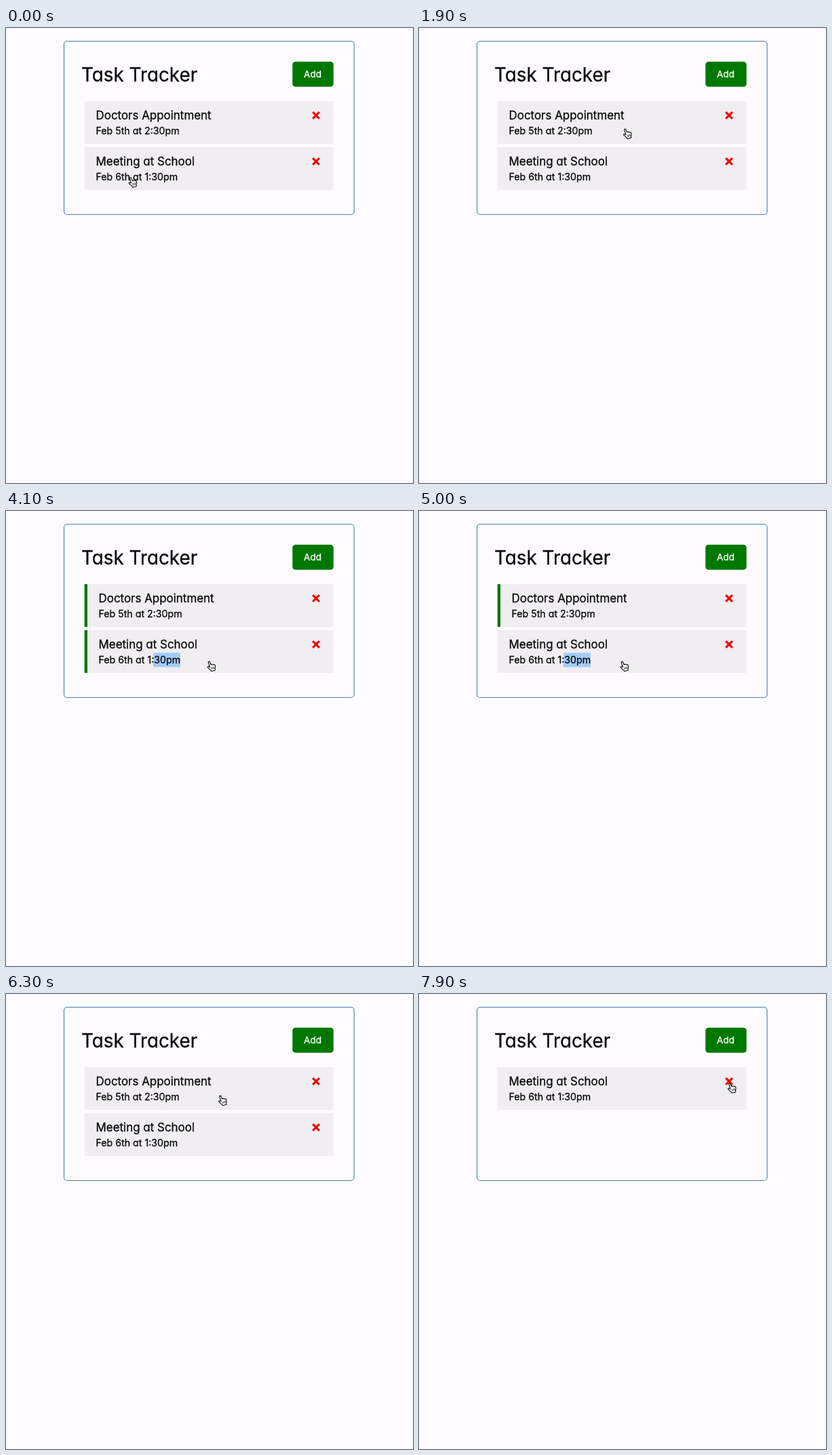
An HTML page that plays this animation: 600x672 px, repeating every 8000 ms.

```html
<!DOCTYPE html>
<html lang="en">
<head>
<meta charset="utf-8">
<title>Task Tracker</title>
<style>
  html, body { margin: 0; width: 100%; height: 100%; overflow: hidden; background: #fdfbff; }
  svg { display: block; width: 600px; height: 672px; }
  text {
    font-family: Inter, "Open Sans", sans-serif;
    font-feature-settings: "cv11";
    font-optical-sizing: none;
    fill: #0b0b0b;
    stroke: #0b0b0b;
    stroke-width: .3px;
  }
  .heading { font-size: 27.8px; }
  .add { font-size: 13.6px; fill: #fff; stroke: #fff; }
  .name { font-size: 16.95px; }
  .date { font-size: 14.2px; }
  .row { fill: #f0eef1; }
  .green { fill: #007800; }
  .remove { fill: none; stroke: #ee0508; stroke-width: 3.1; stroke-linecap: square; }
  .mark { fill: #a3cbfa; }
  .hand { fill: #fff; stroke: #111; stroke-width: 1.15; stroke-linejoin: round; stroke-linecap: round; }
</style>
</head>
<body>
<svg viewBox="0 0 600 672">
  <rect x="85.5" y="19.5" width="427.7" height="256" rx="4.5" fill="none" stroke="#4682b4" stroke-width="1.1"/>
  <text class="heading" x="111" y="78.5">Task Tracker</text>
  <rect class="green" x="422.3" y="49.7" width="60.5" height="37" rx="4.5"/>
  <text class="add" x="439" y="73">Add</text>
  <g id="tasks"></g>
  <g id="cursor" class="hand">
    <g transform="rotate(-8 6 8)">
      <path d="M2.6 2.2C2.2 .7 4.3 .2 4.8 1.8L6 6C6.3 5.2 8 5.3 8.1 6.3C8.7 5.6 10 5.8 10.1 6.9C10.8 6.4 11.8 6.9 11.9 8C12.1 10 11.8 11.2 10.9 12.8V15L5.2 15.7L4.8 14.3C3.2 13 2 11 .7 9.5C0 8.5 1 7.6 2 8.1L3.9 9.3Z"/>
      <path d="M6 10.2L6.3 12.6M7.9 10L8.2 12.4M9.7 9.8L9.9 12.1" stroke-width=".8"/>
    </g>
  </g>
</svg>
<script>
const LOOP = 8000, STEP = 100, ROW_PITCH = 68;

// Cursor stops: time, centre x, centre y
const path = [
  [0, 186.5, 227.5], [700, 303, 158], [900, 303, 158], [1100, 307, 156],
  [2900, 307, 156], [3300, 303.5, 229], [3700, 302.5, 229], [5500, 302.5, 229],
  [6000, 319, 157], [6400, 319, 157], [6900, 445.5, 140], [7300, 461, 138.5],
  [LOOP, 461, 138.5]
];
const within = (t, from, to) => t >= from && t < to;
const smooth = p => p * p * (3 - 2 * p);

function cursorAt(t) {
  const i = path.findIndex((stop, n) => n && t < stop[0]);
  const [t0, x0, y0] = path[i - 1], [t1, x1, y1] = path[i];
  const p = smooth((t - t0) / (t1 - t0));
  return [x0 + (x1 - x0) * p, y0 + (y1 - y0) * p];
}

const taskMarkup = (name, date) => `
  <g>
    <rect class="row" x="115.7" y="108" width="367" height="63.2"/>
    <rect class="bar green" x="115.7" y="108" width="4.3" height="63.2"/>
    <path class="remove" d="M453.3 125.2l7.6 7.6m0-7.6l-7.6 7.6"/>
    <g class="label">
      <rect class="mark" x="213" y="141.5" width="40" height="21"/>
      <text class="name" x="132.5" y="135">${name}</text>
      <text class="date" x="132.5" y="157">${date}</text>
    </g>
  </g>`;

const list = document.getElementById("tasks");
list.innerHTML = taskMarkup("Doctors Appointment", "Feb 5th at 2:30pm") +
  taskMarkup("Meeting at School", "Feb 6th at 1:30pm");
const [doctor, school] = list.children;
const cursor = document.getElementById("cursor");

const show = (node, on) => node.setAttribute("visibility", on ? "inherit" : "hidden");
const move = (node, x, y) => node.setAttribute("transform", `translate(${x} ${y})`);

function setTask(task, { slot, visible, reminder, marked }) {
  move(task, 0, slot * ROW_PITCH);
  show(task, visible);
  show(task.querySelector(".bar"), reminder);
  show(task.querySelector(".mark"), marked);
  move(task.querySelector(".label"), reminder ? 4 : 0, 0);
}

function render(t) {
  const deleted = t >= 7500;
  setTask(doctor, {
    slot: 0, visible: !deleted, reminder: within(t, 2500, 6200), marked: false
  });
  setTask(school, {
    slot: deleted ? 0 : 1, visible: true,
    reminder: within(t, 3700, 5000), marked: within(t, 3700, 6100)
  });
  const [x, y] = cursorAt(t);
  move(cursor, x - 6, y - 8);
}

const start = performance.now();
function frame(now) {
  const t = Math.max(0, now - start) % LOOP;
  render(Math.floor(t / STEP) * STEP);
  requestAnimationFrame(frame);
}
render(0);
requestAnimationFrame(frame);
</script>
</body>
</html>
```
